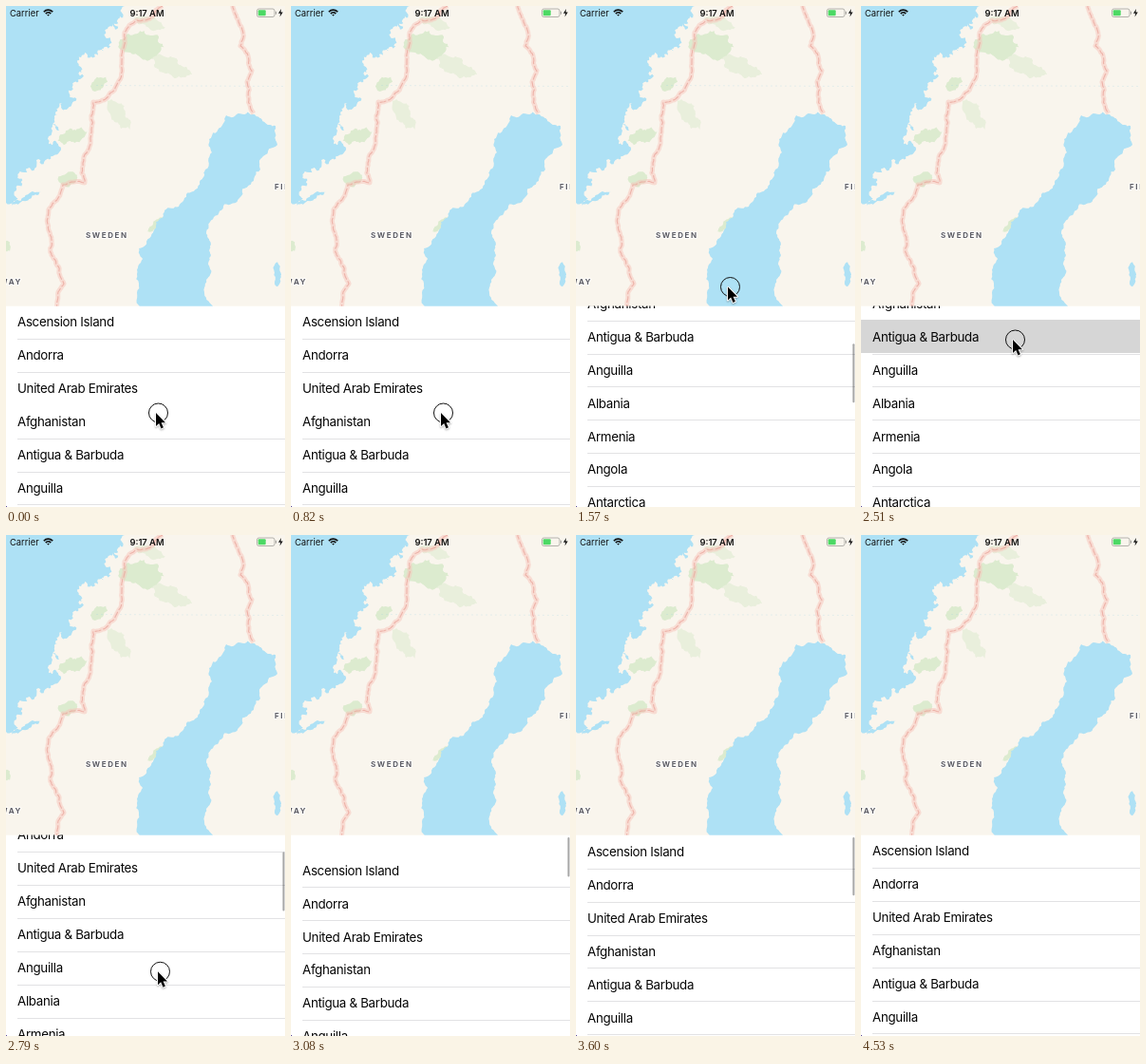
These frames come from a looping animation (294 by 527 pixels, 5.13 s). An HTML page with a canvas:

```html
<!DOCTYPE html>
<html lang="en">
<head>
<meta charset="utf-8">
<title>Country list</title>
<style>
html, body { margin: 0; width: 100%; height: 100%; overflow: hidden; background: #fff; }
canvas { display: block; width: 294px; height: 527px; }
</style>
</head>
<body>
<canvas id="stage"></canvas>
<script>
const W = 294, H = 527, LOOP = 5130, TICK = 58.2;
const TOP = 315.5, ROW = 34.89;
const FONT = 'Inter, Roboto, sans-serif';
const WATER = '#aee1f5', LAND = '#f9f5ed', GREEN = '#dcebcf', PALE = '#e9efdc', INK = '#111';
const countries = ['Ascension Island', 'Andorra', 'United Arab Emirates', 'Afghanistan',
  'Antigua & Barbuda', 'Anguilla', 'Albania', 'Armenia', 'Angola', 'Antarctica', 'Argentina'];

const dpr = Math.max(1, window.devicePixelRatio || 1);
function prepare(canvas) {
  canvas.width = W * dpr;
  canvas.height = H * dpr;
  const c = canvas.getContext('2d');
  c.scale(dpr, dpr);
  return c;
}
const ctx = prepare(document.getElementById('stage'));
const mapCanvas = document.createElement('canvas');
const map = prepare(mapCanvas);

let seed = 11;
function rand() {
  seed = (seed * 16807) % 2147483647;
  return seed / 2147483647;
}

// "x,y x,y ..." to points
const points = s => s.split(' ').map(p => p.split(',').map(Number));

// Fractal edge: shifts midpoints sideways until the pieces are short
function split(p, q, amount) {
  const dx = q[0] - p[0], dy = q[1] - p[1];
  if (Math.hypot(dx, dy) < 3) return [q];
  const d = (rand() - 0.5) * amount;
  const mid = [(p[0] + q[0]) / 2 - dy * d, (p[1] + q[1]) / 2 + dx * d];
  return [...split(p, mid, amount), ...split(mid, q, amount)];
}
const rough = (pts, amount) =>
  pts.flatMap((p, i) => i ? split(pts[i - 1], p, amount) : [p]);

function trace(c, pts) {
  c.beginPath();
  pts.forEach(p => c.lineTo(p[0], p[1]));
}

function fill(c, pts, color) {
  trace(c, pts);
  c.fillStyle = color;
  c.fill();
}

function patch(x, y, rx, ry, color, tilt = 0) {
  const pts = [];
  for (let i = 0; i <= 8; i++) {
    const a = i * Math.PI / 4, r = 0.85 + rand() * 0.3;
    const u = Math.cos(a) * rx * r, v = Math.sin(a) * ry * r;
    pts.push([x + u * Math.cos(tilt) - v * Math.sin(tilt), y + u * Math.sin(tilt) + v * Math.cos(tilt)]);
  }
  fill(map, rough(pts, 0.5), color);
}

function border(s) {
  trace(map, rough(points(s), 0.25));
  map.lineJoin = 'round';
  map.strokeStyle = 'rgba(248,196,186,0.5)';
  map.lineWidth = 5;
  map.stroke();
  map.strokeStyle = 'rgba(236,168,158,0.8)';
  map.lineWidth = 1.1;
  map.setLineDash([7, 2]);
  map.stroke();
  map.setLineDash([]);
}

function text(c, s, x, y, font, color, spacing = 0, align = 'left') {
  c.font = font + ' ' + FONT;
  c.letterSpacing = spacing + 'px';
  c.textAlign = align;
  c.fillStyle = color;
  c.fillText(s, x, y);
}

function drawMap() {
  map.fillStyle = LAND;
  map.fillRect(0, 0, W, H);

  patch(144, 41, 23, 15, GREEN, 0.1);
  patch(174, 63, 22, 8, PALE, 0.4);
  patch(152, 18, 16, 6, PALE, 0.3);
  patch(118, 114, 18, 9, PALE, 0.9);
  patch(98, 82, 10, 6, GREEN, -0.8);
  patch(70, 137, 15, 8, GREEN, -0.3);
  patch(65, 183, 11, 7, GREEN, -0.2);
  patch(158, 230, 10, 4, GREEN, -0.7);
  patch(1, 253, 4, 6, GREEN);

  const coast = points('125,0 107,24 86,52 72,80 65,108 45,137 32,162 14,189 0,207');
  fill(map, [[0, 0], ...rough(coast, 1.1)], WATER);
  patch(22, 202, 17, 3, WATER, -0.45);

  const gulf = points('232,115 262,114 284,126 286,146 271,158 268,172 246,202 219,222 211,238 ' +
    '216,262 211,288 218,320 145,320 138,282 144,266 140,255 153,242 158,227 182,211 204,185 ' +
    '210,172 217,154 214,140 232,115');
  fill(map, rough(gulf, 0.45), WATER);
  patch(286, 283, 4, 13, WATER);

  map.strokeStyle = 'rgba(150,205,225,0.3)';
  map.lineWidth = 0.7;
  map.setLineDash([2, 3]);
  trace(map, [[95, 83.5], [W, 84.5]]);
  map.stroke();
  map.setLineDash([]);

  border('165,0 153,12 138,15 125,28 122,58 107,96 92,101 90,130 81,165 83,186 60,188 49,208 ' +
    '48,262 61,292 53,318');
  border('238,-2 249,25 247,42 259,68 254,80 261,113');

  label('SWEDEN', 84, 244);
  label('NORWAY', -29, 292.5);
  label('FINLAND', 283, 193);
  drawStatus(map);
}

function label(s, x, y) {
  map.font = '700 8px ' + FONT;
  map.letterSpacing = '1.6px';
  map.strokeStyle = 'rgba(255,255,255,0.8)';
  map.lineWidth = 2;
  map.strokeText(s, x, y);
  text(map, s, x, y, '700 8px', '#5c5c64', 1.6);
}

function box(c, x, y, w, h, r, color) {
  c.beginPath();
  c.roundRect(x, y, w, h, r);
  c.fillStyle = color;
  c.fill();
}

function drawStatus(c) {
  text(c, 'Carrier', 4, 10.5, '400 9.4px', INK);
  text(c, '9:17 AM', 148.5, 10.5, '600 9.4px', INK, 0, 'center');

  const from = -Math.PI * 0.76, to = -Math.PI * 0.24;
  c.strokeStyle = INK;
  c.lineWidth = 1.7;
  for (const r of [1, 3.7, 6.4]) {
    c.beginPath();
    c.arc(44.5, 10.6, r, from, to);
    c.stroke();
  }

  c.strokeStyle = '#a3a19c';
  c.lineWidth = 0.8;
  c.beginPath();
  c.roundRect(264.5, 3, 18.5, 8.5, 2);
  c.stroke();
  box(c, 284, 5.8, 1, 3, 0, '#a3a19c');
  box(c, 265.7, 4.2, 8, 6.1, 1, '#4cd964');
  fill(c, points('290,3 287,7.8 289.3,7.8 288.5,11.5 291.8,6.4 289.5,6.4'), INK);
}

// Smooth 0 to 1 between ticks a and b
function ease(n, a, b) {
  const u = Math.min(1, Math.max(0, (n - a) / (b - a)));
  return u * u * (3 - 2 * u);
}

// Critically damped return, 0 to 1
function spring(n) {
  const s = Math.max(0, n) * 0.56;
  return 1 - (1 + s) * Math.exp(-s);
}

const between = (n, a, b) => n >= a && n < b;

// Drag up, drag down past the top, bounce back
const scrollAt = n =>
  124 * ease(n, 19.08, 27) - 144.5 * ease(n, 44, 52) + 20.5 * spring(n - 53);

const cursorAt = n => [
  160.5 + 2 * ease(n, 20, 27),
  428 - 132.5 * ease(n, 17.7, 27) + 55.5 * ease(n, 34, 40) + 199 * ease(n, 43.5, 52)
];

function barAlpha(n) {
  if (between(n, 19, 32)) return n < 31 ? 1 : 0.45;
  if (between(n, 45, 67)) return n < 66 ? 1 : 0.45;
  return 0;
}

function drawList(n) {
  const scroll = scrollAt(n);
  ctx.save();
  ctx.beginPath();
  ctx.rect(0, TOP, W, H - TOP);
  ctx.clip();
  ctx.fillStyle = '#fff';
  ctx.fillRect(0, TOP, W, H - TOP);

  const touched = n < 18 ? 3 : -1;
  const lit = between(n, 42, 45) ? 4 : -1;
  countries.forEach((name, i) => {
    const y = TOP + i * ROW - scroll;
    if (i + 1 !== touched) {
      ctx.fillStyle = '#e2e2e4';
      ctx.fillRect(12, Math.round(y + ROW - 0.4), W - 12, 1);
    }
    if (i === lit) {
      ctx.fillStyle = '#d6d6d6';
      ctx.fillRect(0, Math.round(y - 0.6), W, Math.round(ROW));
    }
    text(ctx, name, 12, y + 21.8, '400 13.33px', '#050505', -0.31);
  });

  const alpha = barAlpha(n);
  if (alpha) {
    const y = 318 + Math.max(0, scroll) * 0.3;
    box(ctx, 291.5, y, 2, 62 + Math.min(0, scroll), 1, `rgba(0,0,0,${0.35 * alpha})`);
  }
  ctx.restore();
}

const arrow = points('0,0 0,14 3.2,11.1 5.5,16.4 7.9,15.3 5.6,10.2 10,10.2 0,0');

function drawCursor(n) {
  if (n >= 52) return;
  const [x, y] = cursorAt(n);
  const pressed = n < 1 || between(n, 14, 28) || n >= 40;
  if (pressed) {
    ctx.strokeStyle = INK;
    ctx.lineWidth = 1;
    ctx.beginPath();
    ctx.arc(x, y, 10, 0, 7);
    ctx.stroke();
  }
  ctx.save();
  ctx.translate(x - 2.5, y);
  trace(ctx, arrow);
  ctx.lineJoin = 'round';
  ctx.shadowColor = 'rgba(0,0,0,0.3)';
  ctx.shadowBlur = 2 * dpr;
  ctx.shadowOffsetY = dpr;
  ctx.strokeStyle = '#fff';
  ctx.lineWidth = 2;
  ctx.stroke();
  ctx.shadowColor = 'transparent';
  ctx.fillStyle = '#000';
  ctx.fill();
  ctx.restore();
}

function draw(ms) {
  // The screen updates in discrete ticks
  const n = Math.floor((ms + 14) / TICK);
  ctx.drawImage(mapCanvas, 0, 0, W, H);
  drawList(n);
  drawCursor(n);
  ctx.fillStyle = '#5a4a9c';
  ctx.fillRect(0, H - 1, 1, 1);
}

drawMap();
const start = performance.now();
function loop() {
  draw((performance.now() - start) % LOOP);
  requestAnimationFrame(loop);
}
loop();
</script>
</body>
</html>
```
